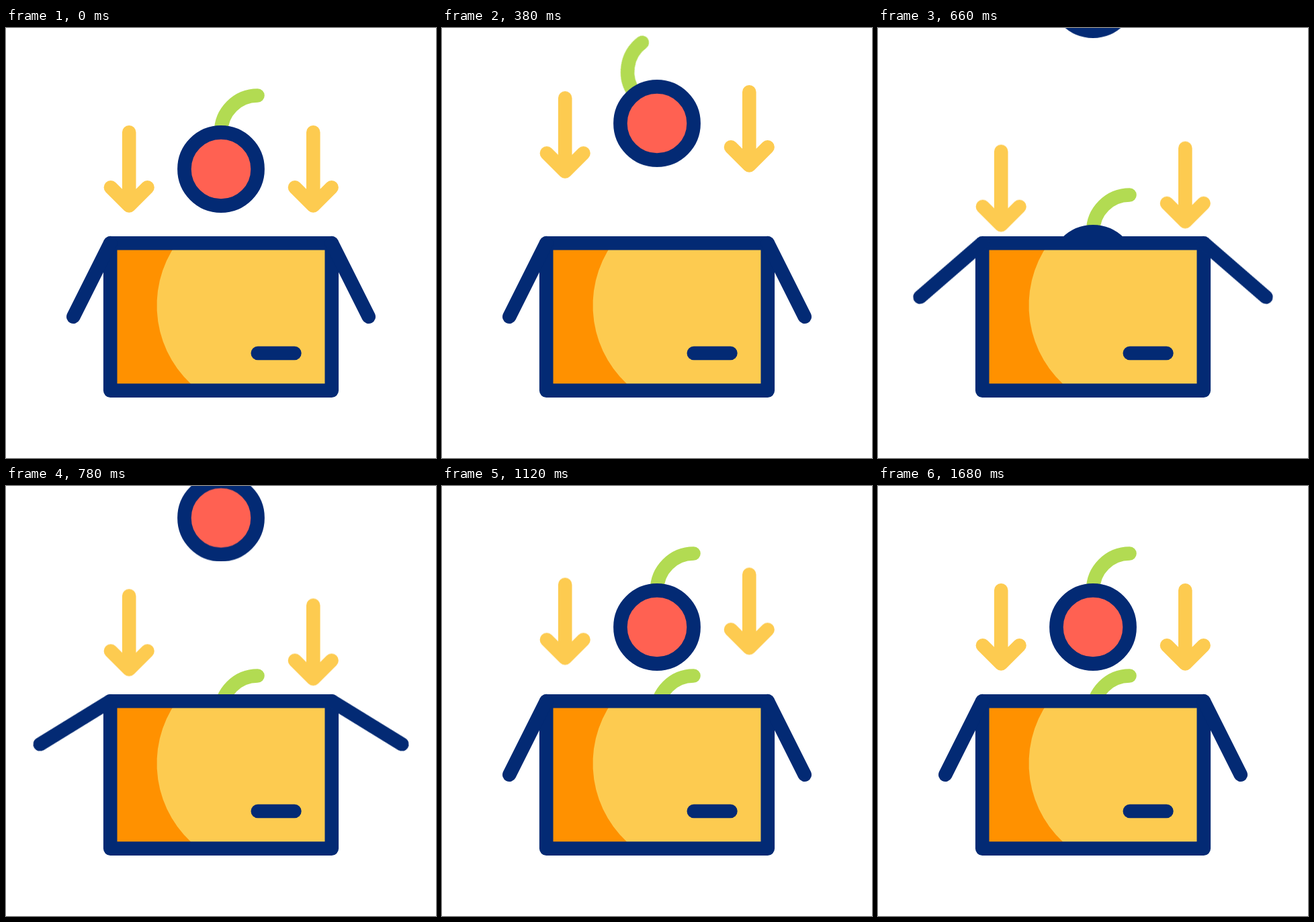
Write an HTML page that moves like this. It is 640 px wide and 640 px high and loops after 1840 ms.

```html
<!DOCTYPE html>
<html lang="en">
<head>
<meta charset="utf-8">
<title>Packing a cherry</title>
<style>
  :root {
    --navy: #032a74;
    --yellow: #fdcb50;
    --orange: #ff9100;
    --red: #ff6152;
    --green: #b2db52;
  }
  html, body { margin: 0; width: 100%; height: 100%; overflow: hidden; background: #fff; }
  svg { display: block; width: 100%; height: 100%; overflow: hidden; }

  .line { fill: none; stroke: var(--navy); stroke-width: 20.6; stroke-linecap: round; stroke-linejoin: round; }
  .line.yellow { stroke: var(--yellow); }
  .line.green { stroke: var(--green); }
  .line.red { fill: var(--red); }

  .move { animation: 1840ms cubic-bezier(.333, 0, .667, 1) infinite both; }
  .arrow { animation-name: bob; }
  .late { animation-delay: 65ms; }
  .flap { animation-name: flap; transform-origin: 155.2px 320.2px; }
  .stem { transform-origin: 320px 210px; }
  .packed { animation-name: pack; }
  .packed-stem { animation-name: pack-sway; }
  .next { animation-name: arrive; }
  .next-stem { animation-name: arrive-sway; }

  @keyframes bob {
    0% { transform: translateY(0); }
    17.17% { transform: translateY(-60px); }
    35.05% { transform: translateY(29px); }
    53.7% { transform: translateY(-30.5px); }
    69.84% { transform: translateY(21.8px); }
    87.66%, 100% { transform: translateY(0); }
  }
  @keyframes flap {
    0%, 29.62% { transform: rotate(0deg); }
    39.89% { transform: rotate(33.6deg); }
    58.04%, 100% { transform: rotate(0deg); }
  }
  /* one cherry drops into the box while the next falls from above */
  @keyframes pack {
    0% { transform: translateY(0); }
    20.22% { transform: translateY(-68.5px); }
    40.65%, 100% { transform: translateY(182px); }
  }
  @keyframes pack-sway {
    0% { transform: rotate(0deg); }
    20.22% { transform: rotate(-37deg); }
    34.78%, 100% { transform: rotate(0deg); }
  }
  @keyframes arrive {
    0%, 32.45% { transform: translateY(-278px); }
    55%, 100% { transform: translateY(0); }
  }
  @keyframes arrive-sway {
    0%, 34% { transform: rotate(0deg); }
    50% { transform: rotate(24deg); }
    59.24%, 100% { transform: rotate(0deg); }
  }
</style>
</head>
<body>
<svg viewBox="0 0 640 640">
  <defs>
    <path id="stem" class="line green" d="M320 155A54.5 54.5 0 0 1 374.5 100.5"/>
    <circle id="fruit" class="line red" cx="320" cy="210" r="54.6"/>
    <path id="arrow" class="line yellow" d="M0 155.3V264.5M-27.3 237.2L0 264.5L27.3 237.2"/>
    <path id="flap" class="line" d="M155.2 320.2L100.3 429.7"/>
  </defs>

  <g class="move packed">
    <g class="move stem packed-stem"><use href="#stem"/></g>
    <use href="#fruit"/>
  </g>
  <g class="move next">
    <g class="move stem next-stem"><use href="#stem"/></g>
    <use href="#fruit"/>
  </g>

  <g class="move arrow"><use href="#arrow" x="183.2"/></g>
  <g class="move arrow late"><use href="#arrow" x="457.3"/></g>

  <rect x="155" y="320" width="330" height="220" fill="var(--orange)"/>
  <path d="M254.3 320A160 160 0 0 0 287.2 540H485V320Z" fill="var(--yellow)"/>
  <rect class="line" x="155.2" y="320.2" width="329.6" height="219.4"/>
  <path class="line" d="M374.8 484H429.4"/>

  <g class="move flap"><use href="#flap"/></g>
  <g transform="translate(640 0) scale(-1 1)">
    <g class="move flap"><use href="#flap"/></g>
  </g>
</svg>
</body>
</html>
```
